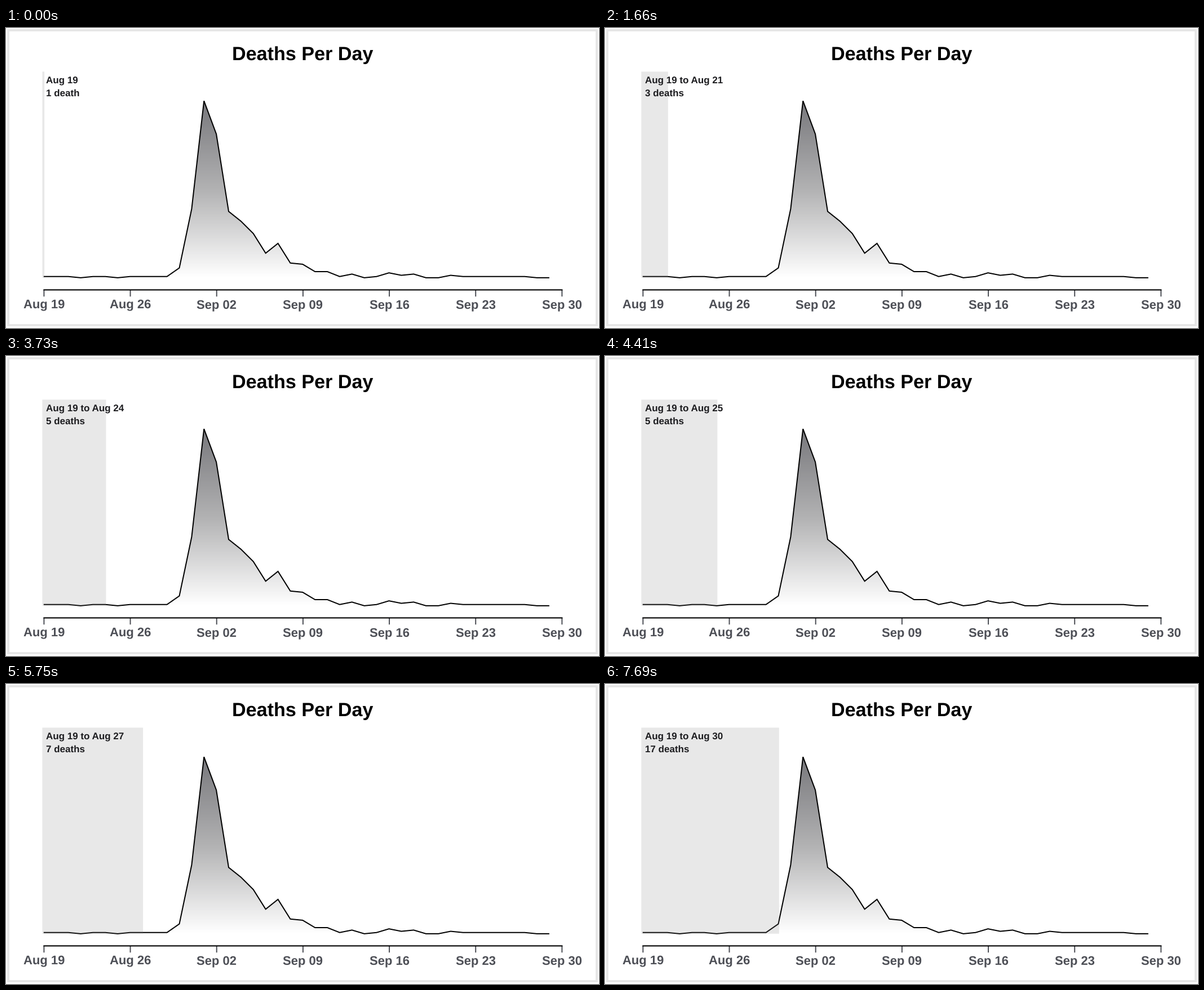
Recreate the animation shown at these times as a matplotlib script. Size 1052 by 532 pixels, loop 8 s.

```python
import numpy as np
import matplotlib.pyplot as plt
from matplotlib.animation import FuncAnimation
from matplotlib.colors import LinearSegmentedColormap
from matplotlib.patches import Polygon, Rectangle

W, H, DPI = 1052, 532, 100
LOOP, STEP = 8000, 20
PT = 72 / DPI  # points per pixel

plt.rcParams["font.family"] = "Liberation Sans"
plt.rcParams["font.weight"] = "bold"
plt.rcParams["text.hinting"] = "none"

DEATHS = np.array([1, 1, 1, 0, 1, 1, 0, 1, 1, 1, 1, 8, 56, 144, 117, 54, 46,
                   36, 20, 28, 12, 11, 5, 5, 1, 3, 0, 1, 4, 2, 3, 0, 0, 2]
                  + [1] * 6 + [0, 0])
TOTALS = np.cumsum(DEATHS)
# Times in ms at which the highlighted range grows by one day
ADVANCE = np.array([920, 1660, 2400, 3080, 3730, 4410,
                    5070, 5750, 6430, 7030, 7690])

X0, DAY_W = 66.8, 21.88
BASE, UNIT = 442.9, 2.178
AXIS_Y, AXIS_SHIFT = 464.4, 0.6
BAND_LEFT, BAND_TOP, BAND_PAD = 64.4, 77.4, 1.3


def day_x(day):
    return X0 + DAY_W * day


def date_name(day):
    return f"Aug {19 + day}" if day <= 12 else f"Sep {day - 12:02d}"


fig = plt.figure(figsize=(W / DPI, H / DPI), dpi=DPI, facecolor="white")
ax = fig.add_axes([0, 0, 1, 1])
ax.set_axis_off()


def label(x, y, text, size, color, ha="left"):
    return ax.text(x, y, text, fontsize=size * PT, color=color,
                   ha=ha, va="baseline", zorder=6)


def stroke(xs, ys, color, width, z):
    ax.plot(xs, ys, color=color, lw=width * PT, zorder=z, snap=False,
            solid_capstyle="butt", solid_joinstyle="miter")


# Card border and title
ax.add_patch(Rectangle((4, 4), 1044, 523, fill=False, ec="#e6e6e6",
                       lw=4 * PT, joinstyle="miter"))
label(525.8, 56.6, "Deaths Per Day", 34.2, "black", "center")

# Area with vertical fade, and its outline
xs = day_x(np.arange(len(DEATHS)))
ys = BASE - UNIT * DEATHS
fade = LinearSegmentedColormap.from_list("fade",
                                         ["#78787c", "#b2b2b3", "white"])
area = ax.imshow(np.linspace(0, 1, 256)[:, None], cmap=fade, aspect="auto",
                 extent=(xs[0], xs[-1], BASE, ys.min()),
                 interpolation="bilinear", zorder=2)
outline = np.column_stack([xs, ys])
shape = Polygon(np.vstack([outline, [xs[-1], BASE], [xs[0], BASE]]),
                transform=ax.transData)
area.set_clip_path(shape)
stroke(xs, ys, "black", 2, 3)

# Date axis
for day in range(0, 43, 7):
    x = day_x(day) + AXIS_SHIFT
    stroke([x, x], [AXIS_Y, 476.2], "#4d4f56", 2, 3)
    label(x, 497.2, date_name(day), 22, "#4d4f56", "center")
stroke([day_x(0) - 0.4, day_x(42) + 1.6], [AXIS_Y, AXIS_Y], "black", 2.1, 4)

# Growing highlight and its caption
band = ax.add_patch(Rectangle((BAND_LEFT, BAND_TOP), 1, BASE - BAND_TOP,
                              fc="#808080", alpha=0.18, lw=0, zorder=5,
                              snap=False))
span = label(70.6, 98, "", 17.05, "#1c1c1f")
count = label(70.6, 121, "", 17.05, "#1c1c1f")

ax.set_xlim(0, W)
ax.set_ylim(H, 0)


def update(frame):
    t = frame * STEP + STEP / 2
    day = int(np.searchsorted(ADVANCE, t, side="right"))
    band.set_width(day_x(day) + BAND_PAD - BAND_LEFT)
    first = date_name(0)
    span.set_text(f"{first} to {date_name(day)}" if day else first)
    total = TOTALS[day]
    count.set_text(f"{total} death" + ("s" if total > 1 else ""))
    return band, span, count


anim = FuncAnimation(fig, update, frames=LOOP // STEP, interval=STEP,
                     init_func=lambda: update(0), repeat=True, repeat_delay=0)
plt.show()
```
